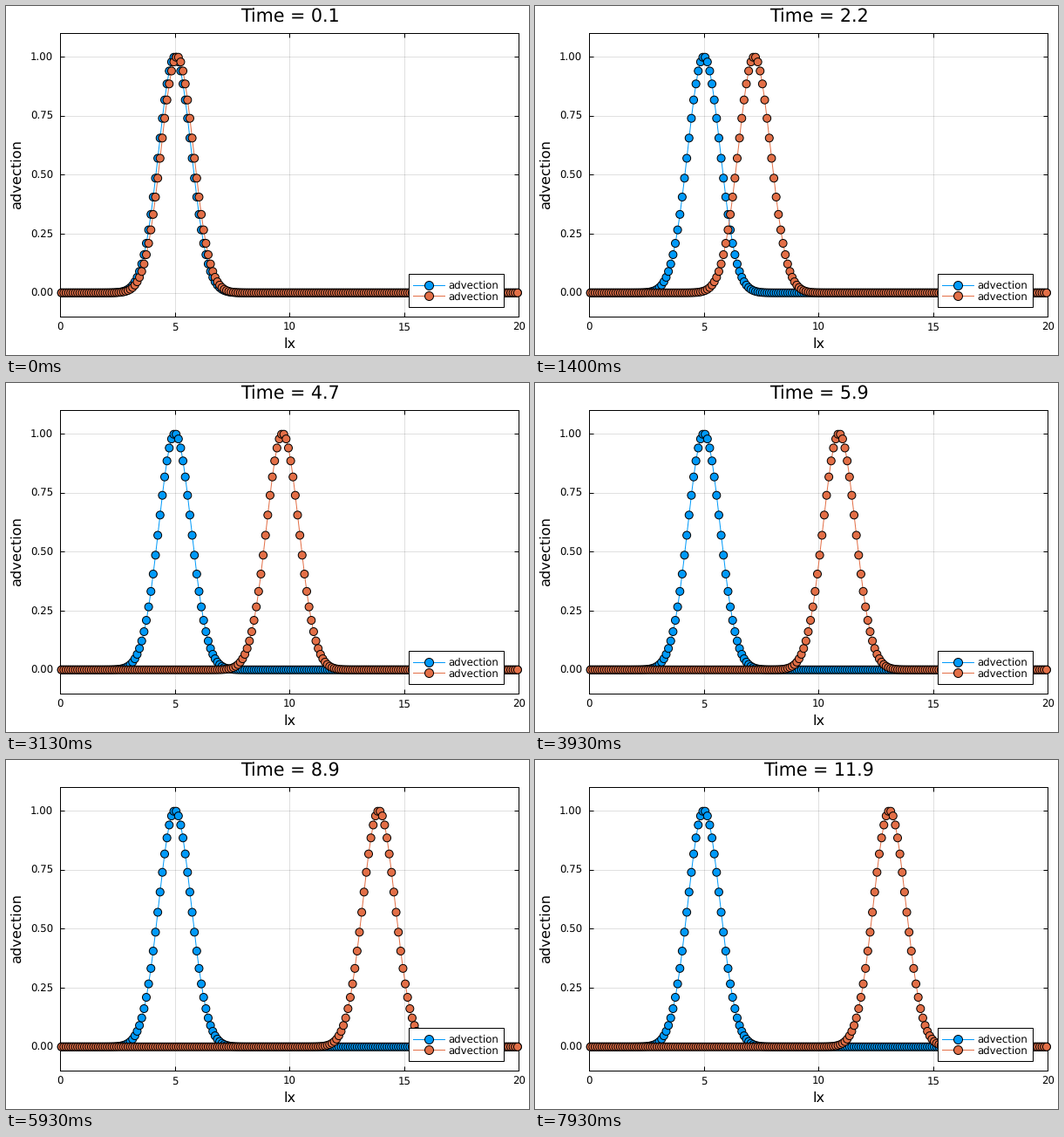
A matplotlib script for the animation above (8 s loop, 600x400 px).

```python
import matplotlib as mpl
import matplotlib.pyplot as plt
import numpy as np
from matplotlib.animation import FuncAnimation
from matplotlib.patches import Rectangle

W, H, DPI = 600, 400, 100
PX = 72 / DPI  # points per pixel
LEFT, RIGHT, TOP, BOTTOM = 62.4, 588.2, 31.0, 355.8
BLUE, ORANGE = "#009AFA", "#E36F47"
SMALL, MEDIUM, LARGE = 11.75, 16.2, 20.6
FRAMES, LOOP = 120, 8000
LX, DX, DT = 20, 0.1, 0.1
TURN = 10  # time at which the velocity flips

mpl.rcParams["font.family"] = "DejaVu Sans"
mpl.rcParams["text.hinting"] = "none"

fig = plt.figure(figsize=(W / DPI, H / DPI), dpi=DPI, facecolor="white")
ax = fig.add_axes([LEFT / W, 1 - BOTTOM / H, (RIGHT - LEFT) / W, (BOTTOM - TOP) / H])
page = fig.add_axes([0, 0, 1, 1], zorder=2)
page.set(xlim=(0, W), ylim=(H, 0))
page.axis("off")


def label(x, y, text, size, ha="center", **kw):
    return page.text(x, y, text, fontsize=size * PX, ha=ha, va="baseline", **kw)


def dots(axes, x, y, color, size, zorder):
    # one size per dot keeps sub-pixel positions
    return axes.scatter(x, y, s=np.full(len(x), (size * PX) ** 2), c=color,
                        edgecolors="black", linewidths=PX, zorder=zorder,
                        clip_on=False)


def pulse(center):
    return np.exp(-(x - center) ** 2)


def series(center, color, zorder):
    y = pulse(center)
    line, = ax.plot(x, y, color=color, lw=PX, zorder=zorder)
    return line, dots(ax, x, y, color, 9, zorder + 1)


# plot frame
xticks = np.arange(0, LX + 1, 5)
yticks = np.linspace(0, 1, 5)
ax.set(xlim=(0, LX), ylim=(-0.1, 1.1), xticks=xticks, yticks=yticks)
ax.set_axisbelow(True)
ax.grid(color="black", alpha=0.12, lw=PX)
ax.tick_params(direction="in", length=5 * PX, width=PX, top=True, right=True,
               labelbottom=False, labelleft=False)
for spine in ax.spines.values():
    spine.set_linewidth(PX)

for v in xticks:
    label(LEFT + (RIGHT - LEFT) * v / LX, 371.5, f"{v}", SMALL)
for v in yticks:
    y = BOTTOM - (BOTTOM - TOP) * (v + 0.1) / 1.2
    label(54, y + 4.3, f"{v:.2f}", SMALL, ha="right")
label(325.2, 392, "lx", MEDIUM)
label(16.7, 193.2, "advection", MEDIUM, rotation=90, rotation_mode="anchor")
title = label(325.8, 18.3, "", LARGE)

# curves
x = np.arange(DX / 2, LX, DX)
series(5, BLUE, 3)
line, marks = series(5, ORANGE, 5)

# legend
page.add_patch(Rectangle((461.5, 306.5), 109.5, 38.5, fc="white", ec="black", lw=PX))
for y, color in ((319.5, BLUE), (332.4, ORANGE)):
    page.plot([467, 503], [y, y], color=color, lw=PX, zorder=3)
    dots(page, [485.2], [y], color, 10, 4)
    label(507.3, y + 4.3, "advection", SMALL, ha="left")


def update(n):
    t = (n + 1) * DT
    y = pulse(5 + TURN - abs(TURN - t))
    line.set_ydata(y)
    marks.set_offsets(np.column_stack([x, y]))
    title.set_text(f"Time = {t:.1f}")
    return line, marks, title


anim = FuncAnimation(fig, update, frames=FRAMES, interval=LOOP / FRAMES,
                     repeat=True, repeat_delay=0)
plt.show()
```
